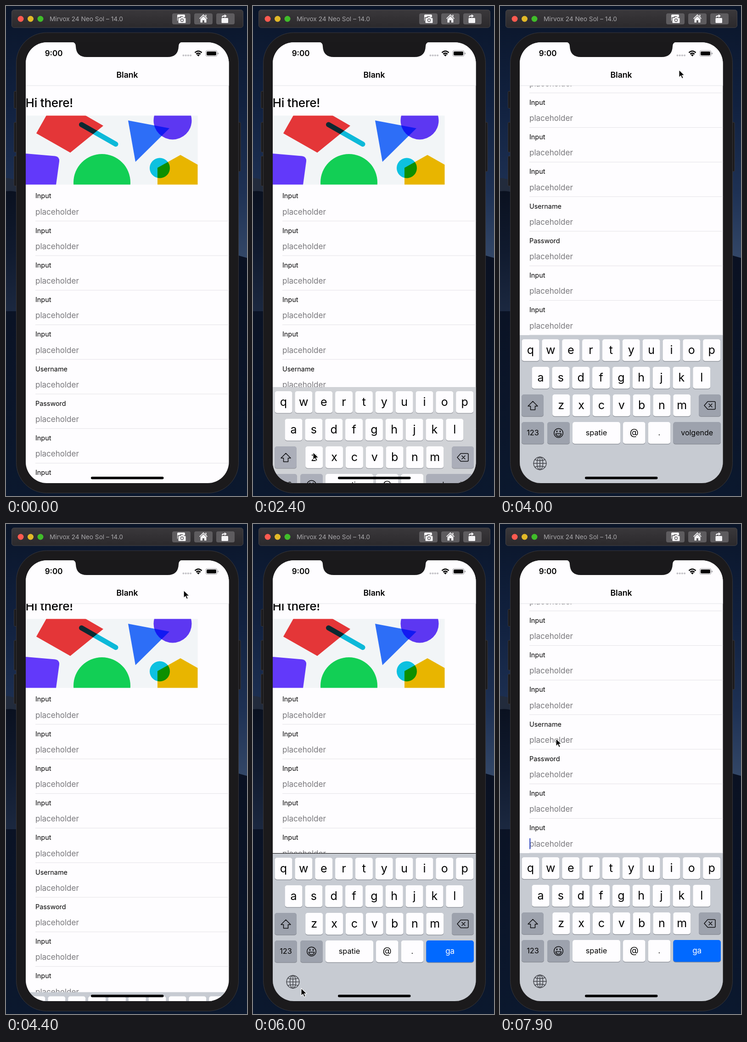
These frames come from a looping animation (525 px wide and 1066 px high, 8 s). An HTML page:

```html
<!DOCTYPE html>
<html lang="en">
<head>
<meta charset="utf-8">
<title>Form with keyboard</title>
<style>
  html, body { margin: 0; width: 100%; height: 100%; overflow: hidden; background: #0c1629; }
  svg { display: block; width: 100vw; height: 100vh; font-family: Inter, Roboto, sans-serif; }
  .mid { text-anchor: middle; }
  .hero { isolation: isolate; }
  .hero .mix { mix-blend-mode: multiply; }
  .label { font-size: 14.4px; }
  .hint { font-size: 17px; fill: #79787c; }
  .line { stroke: #e3e2e6; }
  .icon { fill: none; stroke: #0b0b0d; stroke-width: 1.5; stroke-linejoin: round; stroke-linecap: round; }
  #kb { --bg: #d0d2d6; --mod: #abaeb9; --edge: #94969d; }
  #kb.settled { --bg: #c7cbd2; --mod: #9da2ad; --edge: #858991; }
  #kb .bg { fill: var(--bg); }
  #kb .edge { fill: var(--edge); }
  #kb .key { fill: #fefdff; }
  #kb .mod { fill: var(--mod); }
  #kb .go { fill: #0169ff; }
</style>
</head>
<body>
<svg viewBox="0 0 525 1066" preserveAspectRatio="none">
  <defs>
    <linearGradient id="sky" x2="0" y2="1">
      <stop offset="0" stop-color="#0a1529"/><stop offset=".2" stop-color="#11213f"/>
      <stop offset=".38" stop-color="#1e3154"/><stop offset=".52" stop-color="#344868"/>
    </linearGradient>
    <linearGradient id="dune" x2="0" y2="1">
      <stop offset="0" stop-color="#0a1120"/><stop offset=".5" stop-color="#101a2e"/><stop offset="1" stop-color="#1b2840"/>
    </linearGradient>
    <linearGradient id="ground" x2="0" y2="1">
      <stop offset="0" stop-color="#0a1122"/><stop offset="1" stop-color="#0b182e"/>
    </linearGradient>
    <linearGradient id="bar" x2="0" y2="1">
      <stop offset="0" stop-color="#3a383b"/><stop offset="1" stop-color="#2b292c"/>
    </linearGradient>
    <clipPath id="screen"><rect x="43" y="79" width="442.5" height="959" rx="46"/></clipPath>
    <clipPath id="picture"><rect x="43" y="238.5" width="374.5" height="150"/></clipPath>
  </defs>

  <!-- desktop -->
  <path fill="url(#sky)" d="M0 0H525V1066H0z"/>
  <path fill="#222b3c" d="M0 374Q14 374 30 384V420H0z"/>
  <path fill="url(#dune)" d="M0 403Q14 401 30 406V664H0z"/>
  <path fill="url(#ground)" d="M0 664H260L500 541L525 548V1066H0z"/>

  <!-- window bar -->
  <rect x="12.5" y="8.5" width="504" height="38.5" rx="5" fill="url(#bar)" stroke="#474548"/>
  <circle cx="32" cy="28" r="6.5" fill="#fd5a50"/>
  <circle cx="53.5" cy="28" r="6.5" fill="#e2b928"/>
  <circle cx="75" cy="28" r="6.5" fill="#40bd2a"/>
  <text x="95" y="33" font-size="13.7" fill="#a8a7aa">Mirvox 24 Neo Sol – 14.0</text>
  <g fill="#5e5c5f">
    <rect x="362" y="16" width="40" height="24" rx="4"/>
    <rect x="410" y="16" width="40" height="24" rx="4"/>
    <rect x="458" y="16" width="40" height="24" rx="4"/>
  </g>
  <g fill="#f5f4f6">
    <path d="M375 18.5h13q2 0 2 2v4h-4l-1-2h-5l-2 2h-4v8q-1 0-1-2v-10q0-2 2-2z"/>
    <path d="M377 26h3l1.500-2h5l1.500 2h2q1.500 0 1.500 1.500v8q0 1.500-1.500 1.500h-13q-1.500 0-1.500-1.500v-8q0-1.500 1.500-1.500z"/>
    <circle cx="383.500" cy="31" r="3" fill="none" stroke="#5e5c5f" stroke-width="1.300"/>
    <path d="M430 18l9 9-1.300 1.300L430 20.600l-7.700 7.700L421 27z"/>
    <path d="M430 22l6.500 6.500V36H432v-5h-4v5h-4.500v-7.500zM434.500 19h2v5l-2-2z"/>
    <rect x="469.500" y="26" width="14.500" height="11" rx="1.500"/>
    <path d="M470 24.500q0-4 4-4h2V18l5 3.800-5 3.700V23h-2q-2 0-2 1.500z"/>
  </g>

  <!-- phone body -->
  <g fill="#1b1a1c" stroke="#38373a">
    <rect x="17.500" y="185.500" width="8" height="37" rx="2"/>
    <rect x="17.500" y="253" width="8" height="65" rx="2"/>
    <rect x="17.500" y="326.500" width="8" height="65" rx="2"/>
    <rect x="502" y="253" width="9" height="107" rx="2"/>
    <rect x="22.500" y="58" width="484" height="1001.500" rx="66"/>
  </g>

  <g clip-path="url(#screen)">
    <path fill="#fefdff" d="M43 79H486V1039H43z"/>
    <g id="page">
      <text x="42.500" y="220" font-size="26" font-weight="500" letter-spacing="-.2">Hi there!</text>
      <g class="hero" clip-path="url(#picture)">
        <path fill="#f2f5f7" d="M43 238H418V389H43z"/>
        <path fill="#e43638" d="M88 238L66 277L140 319L212 260.500L173 238z"/>
        <path class="mix" d="M164.500 258L239 300.500" stroke="#0dc1e0" stroke-width="11" stroke-linecap="round"/>
        <path fill="#2d6ef7" d="M266 249L356 266L282 339z"/>
        <circle class="mix" cx="363" cy="249" r="41.500" fill="#6239fa"/>
        <path fill="#6239fa" d="M43 321L107 326.500Q117 328 116 338L109 389H43z"/>
        <circle cx="209" cy="384" r="62" fill="#12cf55"/>
        <circle cx="335" cy="352.500" r="22" fill="#0dc1e0"/>
        <path class="mix" fill="#f5bd00" d="M380 324L418 345.500V389H330V352z"/>
      </g>
      <g id="fields"></g>
      <rect id="caret" x="64" width="2.500" height="24" rx="1" fill="#4f62c8"/>
    </g>

    <path fill="#fefdff" d="M43 79H486V173H43z"/>
    <path class="line" d="M43 173.200H486"/>
    <text class="mid" x="264" y="156" font-size="17.600" font-weight="600">Blank</text>
    <text class="mid" x="104" y="109.300" font-size="17" font-weight="600">9:00</text>
    <path d="M386.500 107.500H403" stroke="#c3c2c7" stroke-width="4.200" stroke-linecap="round" stroke-dasharray="0 5.200"/>
    <g fill="none" stroke="#000" stroke-width="2.500">
      <path d="M411.500 101.500Q419 94.500 426.500 101.500M414.300 104.700Q419 100.500 423.700 104.700"/>
      <path fill="#000" stroke="none" d="M416 106.500Q419 104.200 422 106.500L419 109.700z"/>
    </g>
    <rect x="435" y="97" width="25" height="12.500" rx="3.500" fill="none" stroke="#9b9a9e"/>
    <rect x="437" y="99" width="21" height="8.500" rx="2"/>
    <path fill="#9b9a9e" d="M461 101q2 .5 2 2.300t-2 2.300z"/>

    <path id="gap" d="M43 716H486V1039H43z"/>
    <g id="kb"></g>
    <rect x="185" y="1024" width="158.500" height="5.500" rx="2.700"/>
  </g>
  <path fill="#1a191b" d="M144 78.500Q152 79 152 88Q153 111 176 111H352Q375 111 376 88Q376 79 384 78.500z"/>
  <path id="cursor" d="M0 0V16.500L3.900 12.800L6.500 18.800L9.300 17.600L6.700 11.800H12z" stroke="#fff" stroke-width="1.100"/>
</svg>

<script>
const $ = id => document.getElementById(id);
const LOOP = 8000, PITCH = 75.25, KB_HEIGHT = 322, LOW = 32, HIGH = 354;
const OPEN = [2278, 5563], CLOSE = 4150, SETTLE = 430;

// Form fields
const names = ['Input', 'Input', 'Input', 'Input', 'Input', 'Username', 'Password', 'Input', 'Input'];
$('fields').innerHTML = names.map((name, i) => `<g transform="translate(0 ${i * PITCH})">
  <text class="label" x="64" y="418.300">${name}</text>
  <text class="hint" x="64" y="453.500">placeholder</text>
  <path class="line" d="M64 467.800H486"/></g>`).join('');

// Keyboard
function key(x, y, w, text = '', kind = 'key', size = 16.3, id = '') {
  const shape = (cls, dy) => `<rect class="${cls}" x="${x}" y="${y + dy}" width="${w}" height="47.500" rx="5"/>`;
  const drop = size > 20 ? 31.5 : 28.5;
  return `<g id="${id}">${shape('edge', 1.2)}${shape(kind, 0)}
    <text class="mid" x="${x + w / 2}" y="${y + drop}" font-size="${size}">${text}</text></g>`;
}
const row = (letters, x, y) => [...letters].map((c, i) => key(x + i * 43.85, y, 38, c, 'key', 25)).join('');

$('kb').innerHTML = `<path class="bg" d="M43 716H486V1039H43z"/>` +
  row('qwertyuiop', 47.5, 725) + row('asdfghjkl', 69.5, 785) + row('zxcvbnm', 114.2, 845) +
  key(47, 845, 48, '', 'mod') + key(433, 845, 48, '', 'mod') +
  key(47, 905, 49, '123', 'mod') + key(103, 905, 49, '', 'mod') +
  key(158, 905, 104, 'spatie') + key(268, 905, 48.5, '@', 'key', 19.5) + key(322.7, 905, 48.5, '.') +
  key(377.3, 905, 103.7, 'volgende', 'mod', 16, 'next') + key(377.3, 905, 103.7, 'ga', 'go', 17, 'go') +
  `<g class="icon">
    <path d="M71.500 860L82 870.500H76.500V878.500H66.500V870.500H61z"/>
    <path d="M445 869L452.500 860.500H467Q469 860.500 469 862.500V875.500Q469 877.500 467 877.500H452.500z"/>
    <path d="M455 865.500L462 872.500M462 865.500L455 872.500"/>
    <circle cx="127.500" cy="929" r="9.800"/>
    <path d="M124 924.500V926.500M131 924.500V926.500" stroke-width="2.200"/>
    <path d="M121.500 930.500H133.500Q132.500 936 127.500 936T121.500 930.500z"/>
  </g>
  <g class="icon" style="stroke:#404248;stroke-width:1.400">
    <circle cx="87" cy="995" r="13.800"/><ellipse cx="87" cy="995" rx="6.500" ry="13.800"/>
    <path d="M87 981V1009M73 995H101M76 987Q87 991 98 987M76 1003Q87 999 98 1003"/>
  </g>`;
$('go').querySelector('text').setAttribute('fill', '#fff');

// Motion
const clamp = v => Math.max(0, Math.min(1, v));
const smooth = v => v * v * (3 - 2 * v);
function spring(ms) {
  const k = Math.max(0, ms) * 0.018;
  return 1 - (1 + k) * Math.exp(-k);
}

const pointer = [ // time, x, y
  [100, 4, 33], [300, 318, 485], [500, 318, 485], [1300, 131, 964], [2000, 131, 971],
  [3200, 131, 971], [3900, 390, 139], [4300, 390, 139], [4950, 345, 222], [5450, 105, 1010],
  [6300, 105, 1010], [6800, 110, 988], [7600, 126, 357], [7900, 122, 467], [8000, 122, 467]
];
function pointerAt(t) {
  const i = pointer.findIndex(p => p[0] > t);
  if (i < 1) return null;
  const [t0, x0, y0] = pointer[i - 1], [t1, x1, y1] = pointer[i];
  const k = smooth((t - t0) / (t1 - t0));
  return [x0 + (x1 - x0) * k, y0 + (y1 - y0) * k];
}

const move = (el, x, y) => el.setAttribute('transform', `translate(${x} ${y})`);
const show = (el, on) => el.setAttribute('visibility', on ? 'visible' : 'hidden');

function draw(t) {
  const second = t >= OPEN[1];
  const since = t - OPEN[second ? 1 : 0];
  const closing = t >= CLOSE && !second;
  const settled = since >= SETTLE;

  const up = closing ? 1 - spring(t - CLOSE) : spring(since);
  move($('kb'), 0, KB_HEIGHT * (1 - up));
  $('kb').classList.toggle('settled', settled);
  show($('kb'), up > 0.002);
  show($('gap'), settled && !closing);
  show($('next'), !second);
  show($('go'), second);

  const from = second || closing ? LOW : 0;
  const lift = closing ? 0 : smooth(clamp((since - SETTLE - 20) / 300));
  move($('page'), 0, -(from + (HIGH - from) * lift));

  $('caret').setAttribute('y', 435.5 + PITCH * (second ? 8 : 7));
  const blink = (second ? t - 5700 : t - 2400) % 1000;
  show($('caret'), since > 120 && !closing && blink >= 0 && blink < 500);

  const p = pointerAt(t);
  show($('cursor'), p);
  if (p) move($('cursor'), ...p);
}

const start = performance.now();
function tick() {
  draw((performance.now() - start) % LOOP);
  requestAnimationFrame(tick);
}
tick();
</script>
</body>
</html>
```
